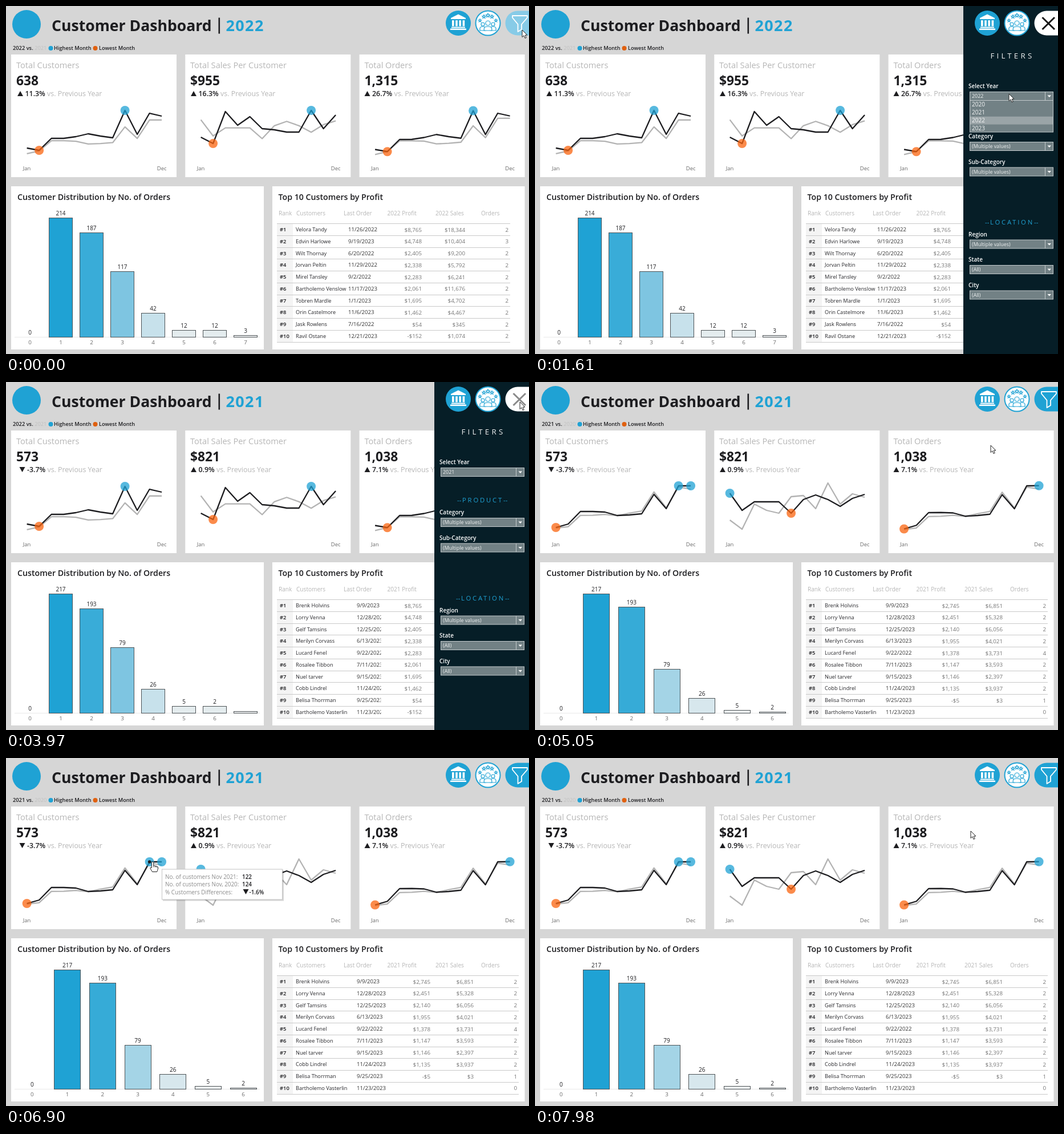
Recreate the animation shown at these times as an HTML page. Size 917x610 px, loop 8 s.

```html
<!DOCTYPE html>
<html lang="en">
<head>
<meta charset="utf-8">
<title>Customer Dashboard</title>
<style>
html, body { margin: 0; width: 100%; height: 100%; overflow: hidden; background: #d6d6d6; }
svg { display: block; width: 917px; height: 610px; font-family: "Open Sans", "Noto Sans", sans-serif; }
text { white-space: pre; }
</style>
</head>
<body>
<svg id="stage" viewBox="0 0 917 610" xmlns="http://www.w3.org/2000/svg"></svg>
<script>
const LOOP = 8000, TICK = 67;
const BLUE = '#1fa2d4', INK = '#1d1d20', PALE = '#b6b6b6', FIELD = '#72818500'.slice(0, 7);

// markup helpers
const T = (x, y, s, size, fill = INK, more = '') =>
  `<text x="${x}" y="${y}" font-size="${size}" fill="${fill}" ${more}>${s}</text>`;
const R = (x, y, w, h, fill, more = '') =>
  `<rect x="${x}" y="${y}" width="${w}" height="${h}" fill="${fill}" ${more}/>`;
const C = (x, y, r, fill, more = '') => `<circle cx="${x}" cy="${y}" r="${r}" fill="${fill}" ${more}/>`;
const P = (d, fill, more = '') => `<path d="${d}" fill="${fill}" ${more}/>`;
const G = (id, body) => `<g id="${id}">${body}</g>`;
const times = (n, f) => Array.from({ length: n }, (_, i) => f(i)).join('');
const BOLD = 'font-weight="700"', SEMI = 'font-weight="600"';
const MID = 'text-anchor="middle"', END = 'text-anchor="end"';
const arrow = (x, y, up) => P(up ? `M${x} ${y}l5-9 5 9z` : `M${x} ${y - 9}h10l-5 9z`, INK);

// monthly lines, as heights on the stage
const MONTH = 21.5, ZERO = 275.5;
const customers = {
  2022: [249, 253, 232, 232, 229, 224, 228, 231, 183, 225, 188, 193],
  2021: [255, 249, 227, 227, 228, 234, 233, 231, 197, 222, 182, 182]
};
customers[2020] = customers[2021].map((y, m) => y + 1 + 6 * Math.sin(.65 * m));
const sales = {
  2022: [230, 241, 185, 209, 194, 215, 217, 221, 221, 183, 215, 191],
  2021: [195, 225, 210, 210, 210, 230, 206, 198, 206, 218, 204, 197],
  2020: [242, 258, 214, 225, 230, 201, 199, 222, 177, 214, 196, 202]
};
const orders = {};
for (const year in customers) orders[year] = customers[year].map((y, m) => y + 2.5 - .25 * m);

// shrink: how far the 2021 line drops on the larger 2022 axis
const cards = [
  { x: 18, title: 'Total Customers', data: customers, shrink: .81 },
  { x: 323, title: 'Total Sales Per Customer', data: sales, shrink: .945 },
  { x: 628.5, title: 'Total Orders', data: orders, shrink: .84 }
];
const monthX = (card, m) => card.x + 18.6 + m * MONTH;

const totals = {
  2022: [['638', '11.3%'], ['$955', '16.3%'], ['1,315', '26.7%']],
  2021: [['573', '-3.7%'], ['$821', '0.9%'], ['1,038', '7.1%']]
};
const counts = { 2022: [0, 214, 187, 117, 42, 12, 12, 3], 2021: [0, 217, 193, 79, 26, 5, 2] };
const people = {
  2022: `Velora Tandy|11/26/2022|$8,765|$18,344|2
Edvin Harlowe|9/19/2023|$4,748|$10,404|3
Wilt Thornay|6/20/2022|$2,405|$9,200|2
Jorvan Peltin|11/29/2022|$2,338|$5,792|2
Mirel Tansley|9/2/2022|$2,283|$6,241|2
Bartholemo Venslow|11/17/2023|$2,061|$11,676|2
Tobren Mardle|1/1/2023|$1,695|$4,702|2
Orin Castelmore|11/6/2023|$1,462|$4,467|2
Jask Rowlens|7/16/2022|$54|$345|2
Ravil Ostane|12/21/2023|-$152|$1,074|2`,
  2021: `Brenk Holvins|9/9/2023|$2,745|$6,851|2
Lorry Venna|12/28/2023|$2,451|$5,328|2
Gelf Tamsins|12/25/2023|$2,140|$6,056|2
Merilyn Corvass|6/13/2023|$1,955|$4,021|2
Lucard Fenel|9/22/2022|$1,378|$3,731|4
Rosalee Tibbon|7/11/2023|$1,147|$3,593|2
Nuel tarver|9/15/2023|$1,146|$2,397|2
Cobb Lindrel|11/24/2023|$1,135|$3,937|2
Belisa Thorrman|9/25/2023|-$5|$3|1
Bartholemo Vasterlin|11/23/2023|||0`
};
const rowsOf = year => people[year].split('\n').map(r => r.split('|'));

function trendView(year) {
  const lines = cards.map(card => {
    const now = card.data[year];
    const before = card.data[year - 1].map(y => year === 2022 ? ZERO - (ZERO - y) * card.shrink : y);
    const best = Math.min(...now), worst = Math.max(...now);
    const line = (ys, c) => P('M' + ys.map((y, m) => `${monthX(card, m)} ${y}`).join('L'), 'none',
      `stroke="${c}" stroke-width="2.3" stroke-linejoin="round"`);
    const marks = now.map((y, m) => y === best || y === worst
      ? C(monthX(card, m), y, 8, y === best ? BLUE : '#f9640f', 'fill-opacity=".75"') : '');
    return line(before, '#b3b3b3') + line(now, INK) + marks.join('');
  });
  return T(12, 77, `${year} vs. <tspan fill="#c0c0c0" font-weight="400">${year - 1}</tspan>`, 9.3, INK, SEMI) + lines.join('');
}

function totalsView(year) {
  return T(385.5, 43.5, year, 27, BLUE, BOLD + ' letter-spacing="1.4"') +
    cards.map((card, i) => {
      const [value, pct] = totals[year][i], up = pct[0] !== '-';
      const x = card.x + (up ? 2 - i : 5.5);
      return T(card.x, 138.5, value, 22.8, INK, BOLD) + arrow(x, 158, up) +
        T(x + 13.5, 158, `<tspan ${SEMI}>${pct}</tspan><tspan fill="${PALE}"> vs. Previous Year</tspan>`, 12.4);
    }).join('');
}

const tint = k => `rgb(${240 - 209 * k},${240 - 78 * k},${240 - 28 * k})`;

// shape: year that sets bar sizes, label: year that sets the numbers
function barView(shape, label) {
  const vals = counts[shape], text = counts[label];
  const gap = 432 / vals.length, w = shape === 2022 ? 41 : 46, first = 15 + gap / 2;
  return vals.map((v, i) => {
    const x = first + i * gap, k = v / vals[1], top = Math.floor(580 - 209 * k) + .5;
    const bar = v ? R(Math.floor(x - w / 2) + .5, top, w, 580.5 - top, tint(k), 'stroke="#4d5356"') : '';
    return bar + (i in text ? T(x, top - 4.5, text[i], 10, INK, MID) + T(x, 593, i, 9.8, '#6a6a6a', MID) : '');
  }).join('');
}

function tableView(names, nums) {
  const dx = nums === 2021 ? 15 : 0, dateX = names === 2021 ? 615 : 600;
  const cut = names === nums ? '' : 'clip-path="url(#dateCut)"';
  const money = rowsOf(nums);
  const head = [[478, 'Rank'], [509, 'Customers'], [592, 'Last Order'], [668.5, names + ' Profit'],
    [753, names + ' Sales'], [833, 'Orders']];
  return head.map(([x, s]) => T(x, 366.5, s, 10.1, PALE)).join('') + R(475, 381, 28, 208, '#f4f4f4') +
    times(11, i => R(475, Math.round(381 + i * 20.77), 409 + dx, 1, '#c9c9c9')) +
    rowsOf(names).map(([name, date], i) => {
      const y = 395 + i * 20.77;
      return T(480, y, '#' + (i + 1), 9.4, INK, SEMI) + T(508, y, name, 9.2, '#26262a') +
        T(dateX, y, date, 9.6, '#333', cut) +
        money[i].slice(2).map((s, k) => T(729 + dx + k * 76, y + .5, s, 9.8, '#777', END)).join('');
    }).join('');
}

// side panel
const field = (y, label, s) => T(760, y - 13.5, label, 10, '#fff', SEMI) +
  R(762.5, y - 7, 146, 15, FIELD, 'stroke="#c3cacc"') + T(766, y + 3.8, s, 8.9, '#eef1f1') +
  P(`M894.5 ${y - 7}v15`, 'none', 'stroke="#c3cacc"') + P(`M898.5 ${y - 1}h6.5l-3.2 3.5z`, '#fff');
const heading = (x, y, s, x2) => T(x, y, '--', 11.5, BLUE) +
  T(x + 9, y, s, 11.3, BLUE, 'letter-spacing="2.8"') + T(x2, y, '--', 11.5, BLUE);
const many = '(Multiple values)';
const panel = R(751, 0, 166, 610, '#061e27') +
  T(798.5, 91.5, 'FILTERS', 13.3, '#f2f4f4', 'letter-spacing="4.2"') +
  heading(791, 211, 'PRODUCT', 872) + heading(789, 382.5, 'LOCATION', 875) +
  field(157.5, 'Select Year', '<tspan id="picked">2022</tspan>') +
  field(245.5, 'Category', many) + field(290, 'Sub-Category', many) +
  field(417, 'Region', many) + field(461.5, 'State', '(All)') + field(506, 'City', '(All)');
const list = R(762.5, 165.5, 146, 55.5, FIELD, 'stroke="#c3cacc"') +
  '<rect id="pick" x="763" width="145" height="13.8" fill="#9aa4a7"/>' +
  times(4, i => T(766, 176 + i * 13.9, 2020 + i, 10, '#f4f6f6'));

// icons
const bank = C(793, 30, 22, BLUE) + P('M793 14.5L806 21V23H780V21Z', '#fff') +
  times(4, i => R(782 + i * 6.2, 25, 3.6, 10.5, '#fff')) +
  R(781, 36.5, 24, 2, '#fff') + R(779, 39.5, 28, 2.5, '#fff');
const star = (x, y, r) => P('M' + Array.from({ length: 10 }, (_, i) => {
  const a = i * Math.PI / 5, k = i % 2 ? r * .45 : r;
  return `${x + k * Math.sin(a)} ${y - k * Math.cos(a)}`;
}).join('L') + 'Z', 'none');
const person = (x, y, r) => C(x, y, r, '#fff') + P(`M${x - r * 1.7} 43v-3q0-4 ${r * 1.7}-4t${r * 1.7} 4v3z`, '#fff');
const crowd = C(845, 30, 21.5, '#fff', `stroke="${BLUE}" stroke-width="2"`) +
  `<g stroke="${BLUE}" stroke-width="1.2">` +
  times(5, i => star(831 + i * 7, 16.5 + 2.25 * (i - 2) ** 2, 3.6 - .4 * Math.abs(i - 2))) +
  person(836, 32, 3) + person(854, 32, 3) + person(845, 30, 4) + '</g>';
const tab = 'M917 8.5H897a21.5 21.5 0 0 0 0 43H917Z';
const funnel = P(tab, BLUE, 'id="funnelBack"') +
  P('M888 17H914V20.5L904 32V41L897.5 45V32L888 20.5Z', 'none', 'stroke="#fff" stroke-width="1.8" stroke-linejoin="round"');
const cross = P(tab, '#fff') + P('M889.5 20L911 41M911 20L889.5 41', 'none', 'id="crossMark" stroke-width="3"');

// tooltips: rows are label, value, optional colour; a % value gets an arrow
function tip(x, y, w, h, vx, rows) {
  return R(x + 2, y + 2, w, h, '#000', 'opacity=".16"') + R(x + .5, y + .5, w - 1, h - 1, '#fff', 'stroke="#c4c4c4"') +
    rows.map(([label, val, tone = '#8a8a8a'], i) => {
      const by = y + 17 + i * 13.7, up = val[0] !== '-', pct = val.endsWith('%');
      return T(x + 6, by, label, 9.9, tone) + (pct ? arrow(x + vx + 1.5, by, up) : '') +
        T(x + vx + (pct ? 12.5 : 0), by, val, 9.9, INK, SEMI);
    }).join('');
}
const ordersTip = tip(659, 269, 167, 67, 121, [
  ['Orders of Jan 2021:', '23'], ['orders of Jan 2020:', '22'],
  ['Orders Difference:', '4.5%'], ['Highest/Lowest Orders:', '23', '#b4b4b4']
]) + C(647, 257, 7.5, 'none', 'stroke="#222"');
const monthTip = (x, y, m, name, now, before, pct) =>
  C(monthX(cards[0], m), customers[2021][m], 2.7, INK) + tip(x, y, 212, 54, 141, [
    [`No. of customers ${name} 2021:`, now], [`No. of customers ${name}, 2020:`, before],
    ['% Customers Differences:', pct]
  ]);

const outline = 'stroke="#222" stroke-linejoin="round"';
const pointer = P('M0 0V12.5L3 9.8L5 14.5L7.2 13.5L5.2 9H9Z', '#fff', outline);
const hand = P('M-1.7 1.5a1.7 1.7 0 0 1 3.4 0V6.5l6 1.5q2 .6 2 3l-1 3.5-1 3H-.5L-4 11.5q-.6-2 1.3-1.7l1 1z', '#fff', outline) +
  P('M1.7 6.5v3M4.5 7.3v2.5M7.2 8v2.3', 'none', 'stroke="#222" stroke-width=".8"');

const stage = document.getElementById('stage');
stage.innerHTML =
  '<clipPath id="dateCut"><rect x="600" y="380" width="57.5" height="212"/></clipPath>' +
  R(0, 0, 917, 610, '#d6d6d6') + times(3, i => R(9 + i * 305.3, 85, 290, 215, '#fff')) +
  R(9, 316, 443, 286, '#fff') + R(467, 316, 442.5, 286, '#fff') +
  C(36, 32, 25, BLUE) + T(80, 43.5, 'Customer Dashboard', 26.6, INK, BOLD) + R(372.5, 20.5, 2.6, 28, INK) +
  C(78.5, 74, 4, BLUE) + T(84, 77, 'Highest Month', 9.2, INK, SEMI) +
  C(156.5, 74, 4, '#e0600f') + T(163, 77, 'Lowest Month', 9.2, INK, SEMI) +
  cards.map(c => T(c.x, 109, c.title, 14.6, PALE) +
    T(monthX(c, 0), 287.5, 'Jan', 9.4, '#666', MID) + T(monthX(c, 11), 287.5, 'Dec', 9.4, '#666', MID)).join('') +
  T(20, 340, 'Customer Distribution by No. of Orders', 14.2, INK, SEMI) +
  T(477.5, 340, 'Top 10 Customers by Profit', 14.2, INK, SEMI) + R(15, 580, 430, 1, '#e9e9e9') +
  G('before', totalsView(2022) + trendView(2022) + barView(2022, 2022) + tableView(2022, 2022)) +
  G('loading', totalsView(2021) + trendView(2022) + barView(2022, 2021) + tableView(2021, 2022)) +
  G('after', totalsView(2021) + trendView(2021) + barView(2021, 2021) + tableView(2021, 2021)) +
  G('panel', panel) + G('list', list) + bank + crowd + G('funnel', funnel) + G('cross', cross) +
  G('tipOrders', ordersTip) +
  G('tipDec', monthTip(282, 196, 11, 'Dec', '122', '117', '4.3%')) +
  G('tipNov', monthTip(273, 194.5, 10, 'Nov', '122', '124', '-1.6%')) +
  G('tipOct', monthTip(246, 226, 9, 'Oct', '69', '63', '9.5%')) +
  G('cursor', G('pointer', pointer) + G('hand', hand));

const el = {};
stage.querySelectorAll('[id]').forEach(n => el[n.id] = n);
const show = (id, on) => el[id].style.display = on ? '' : 'none';

// cursor moves: start, end, x, y; it rests in between
const moves = [
  [60, 200, 897, 27], [950, 1400, 831, 154], [1620, 2200, 811, 186], [2670, 2940, 797, 172],
  [3200, 3950, 901, 35], [4750, 5025, 799, 111], [5025, 5490, 643, 258], [5830, 6160, 490, 345],
  [6160, 6500, 269, 197], [6570, 6830, 257, 182], [7030, 7300, 230, 214], [7430, 7960, 764, 128]
];
const cursorAt = t => moves.reduce(([x, y], [a, b, x1, y1]) => {
  const k = Math.min(1, Math.max(0, (t - a) / (b - a)));
  return [x + (x1 - x) * k, y + (y1 - y) * k];
}, [905, 42]);

function draw(t) {
  const within = (a, b) => t >= a && t < b;
  const [x, y] = cursorAt(Math.floor(t / TICK) * TICK);
  const hover = x >= 876 && y < 52;
  const open = within(680, 4370);
  show('before', t < 3200);
  show('loading', within(3200, 4370));
  show('after', t >= 4370);
  show('panel', open);
  show('cross', open);
  show('funnel', !open);
  show('list', within(1470, 2270));
  el.picked.textContent = t < 2270 ? 2022 : 2021;
  const row = y < 166 ? 2 : Math.floor((y - 166) / 13.9);
  el.pick.setAttribute('y', 166 + row * 13.9);
  el.funnelBack.setAttribute('fill', hover ? '#87cbe7' : BLUE);
  el.crossMark.setAttribute('stroke', hover ? '#8a8a8a' : '#161616');
  show('tipOrders', within(5610, 5880));
  show('tipDec', within(6630, 6830));
  show('tipNov', within(6830, 7170));
  show('tipOct', within(7240, 7440));
  const onMark = within(5540, 5880) || within(6630, 7440);
  show('hand', onMark);
  show('pointer', !onMark);
  el.cursor.setAttribute('transform', `translate(${x.toFixed(1)} ${y.toFixed(1)})`);
}

function tick() {
  draw(performance.now() % LOOP);
  requestAnimationFrame(tick);
}
tick();
</script>
</body>
</html>
```
